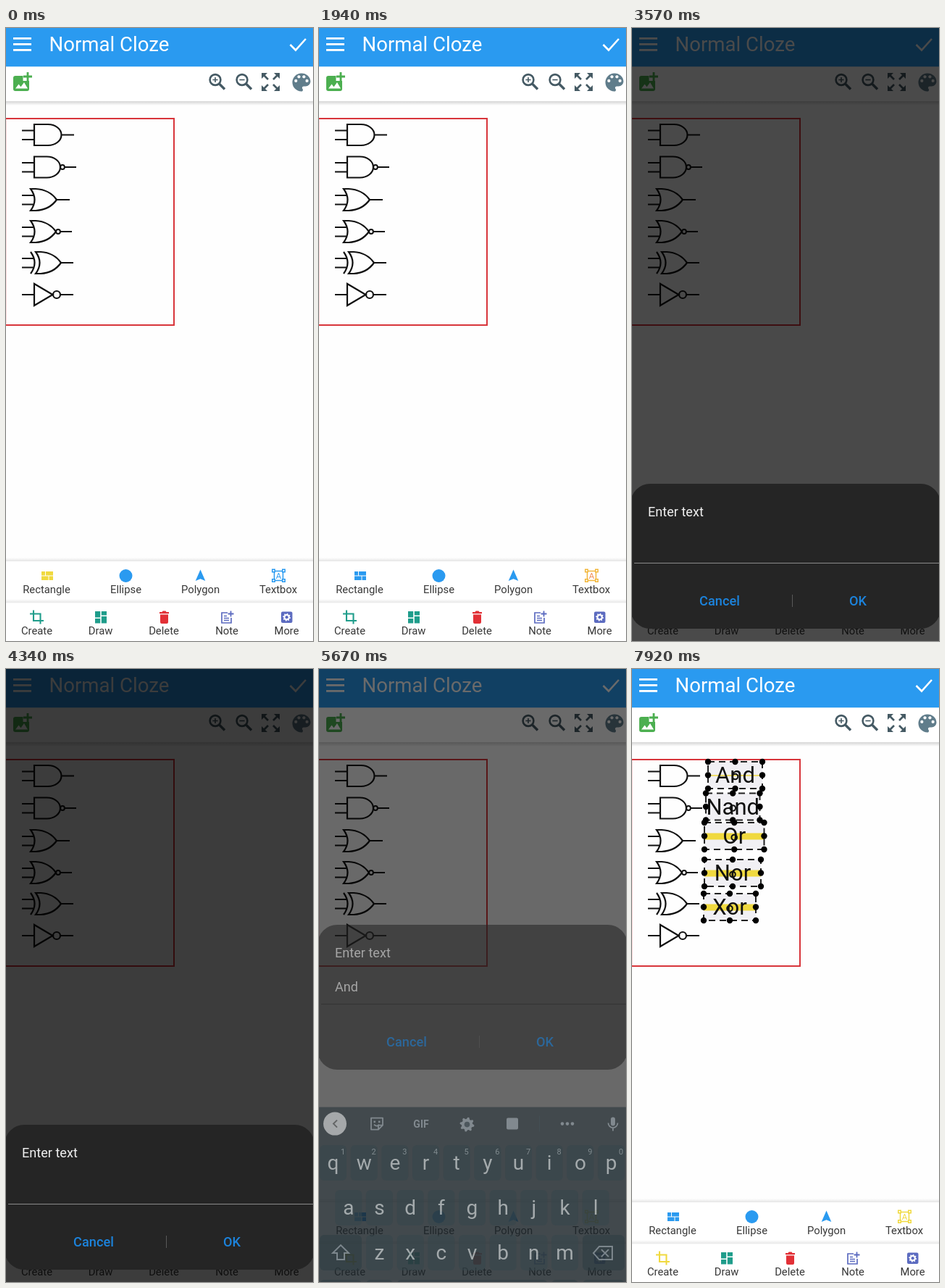
These frames come from a looping animation (424x846 px, 8 s). An HTML page with a canvas:

```html
<!DOCTYPE html>
<html lang="en">
<head>
<meta charset="utf-8">
<title>Normal Cloze</title>
<style>
html, body { margin: 0; width: 100%; height: 100%; overflow: hidden; background: #fefefe; }
canvas { display: block; width: 424px; height: 846px; }
</style>
</head>
<body>
<canvas id="stage"></canvas>
<script>
const W = 424, H = 846, LOOP = 8000;
const BLUE = '#2a9af0', YELLOW = '#f0d93f', TEAL = '#1f9d8b', INDIGO = '#5c6bc0', SLATE = '#455a64';
const canvas = document.getElementById('stage');
const ratio = window.devicePixelRatio || 1;
canvas.width = W * ratio;
canvas.height = H * ratio;
const c = canvas.getContext('2d');
c.scale(ratio, ratio);

const clamp = v => Math.max(0, Math.min(1, v));
const ramp = (t, a, b) => clamp((t - a) / (b - a));
const easeOut = p => 1 - (1 - p) ** 2;
const mix = (a, b, p) => a + (b - a) * p;

function rect(x, y, w, h, color) {
  c.fillStyle = color;
  c.fillRect(x, y, w, h);
}
function round(x, y, w, h, r, color) {
  c.fillStyle = color;
  c.beginPath();
  c.roundRect(x, y, w, h, r);
  c.fill();
}
function disc(x, y, r, color) {
  c.fillStyle = color;
  c.beginPath();
  c.arc(x, y, r, 0, Math.PI * 2);
  c.fill();
}
function ring(x, y, r, color, width, fill) {
  if (fill) disc(x, y, r, fill);
  c.strokeStyle = color;
  c.lineWidth = width;
  c.beginPath();
  c.arc(x, y, r, 0, Math.PI * 2);
  c.stroke();
}
function stroke(path, color, width) {
  c.strokeStyle = color;
  c.lineWidth = width;
  c.stroke(new Path2D(path));
}
function fill(path, color) {
  c.fillStyle = color;
  c.fill(new Path2D(path));
}
function text(s, x, y, size, color, align = 'center', weight = 400) {
  c.font = `${weight} ${size}px Roboto, sans-serif`;
  c.textAlign = align;
  c.fillStyle = color;
  c.fillText(s, x, y);
}
function shade(y, h, from, to) {
  const g = c.createLinearGradient(0, y, 0, y + h);
  g.addColorStop(0, `rgba(0,0,0,${from})`);
  g.addColorStop(1, `rgba(0,0,0,${to})`);
  rect(0, y, W, h, g);
}
function gear(x, y, r, color, hole) {
  c.fillStyle = color;
  c.beginPath();
  for (let i = 0; i < 32; i++) {
    const a = (i + 0.5) * Math.PI / 16, d = i % 4 < 2 ? r : r * 0.76;
    c.lineTo(x + d * Math.cos(a), y + d * Math.sin(a));
  }
  c.fill();
  disc(x, y, r * 0.38, hole);
}

function zoomIcon(x, plus) {
  ring(x, 71.5, 7.4, SLATE, 2.6);
  stroke(`M${x + 5} 76.5l8 8`, SLATE, 3.4);
  stroke(`M${x - 3.6} 71.5h7.2` + (plus ? `M${x} 67.9v7.2` : ''), SLATE, 1.6);
}

function header() {
  rect(0, 0, W, 53.5, BLUE);
  for (const y of [14, 22, 30]) rect(10, y - 1, 25, 2.8, '#fff');
  text('Normal Cloze', 59.5, 32, 27.6, '#fff', 'left');
  stroke('M392.5 23l7.5 7.5L414 15', '#fff', 2.6);

  rect(0, 53.5, W, 47.5, '#fff');
  shade(101, 6, 0.16, 0);
  round(10, 66, 22, 21, 3, '#4caf50');
  rect(23.5, 60, 13, 13, '#fff');
  stroke('M24 67h12M30 61v12', '#4caf50', 2.8);
  fill('M13 83.5l4.5-6 3 3.8 4.5-6.3 5 8.5z', '#fff');
  zoomIcon(289, true);
  zoomIcon(326, false);
  for (const sx of [-1, 1]) for (const sy of [-1, 1]) {
    c.save();
    c.translate(365.5, 74.5);
    c.scale(sx, sy);
    fill('M12.5 12.5v-8l-8 8z', SLATE);
    stroke('M10 10L3.5 3.5', SLATE, 2.6);
    c.restore();
  }
  c.save();
  c.translate(408, 75);
  c.scale(1.39, 1.39);
  c.translate(-12, -12);
  fill('M12 3a9 9 0 0 0 0 18c.83 0 1.5-.67 1.5-1.5 0-.39-.15-.74-.39-1.01-.23-.26-.38-.61-.38-.99 0-.83.67-1.5 1.5-1.5H16c2.76 0 5-2.24 5-5 0-4.42-4.03-8-9-8z', '#607d8b');
  for (const [x, y] of [[6.5, 10.5], [9.5, 6.5], [14.5, 6.5], [17.5, 10.5]]) disc(x, y, 1.5, '#fff');
  c.restore();
}

const orBody = (x, y, tip) =>
  `M${x} ${y - 15}h7Q${tip - 10} ${y - 14} ${tip} ${y}Q${tip - 10} ${y + 14} ${x + 7} ${y + 15}h-7Q${x + 11} ${y} ${x} ${y - 15}z`;
const andBody = (y, flat) => `M39 ${y - 14.5}h${flat}a18.5 14.5 0 0 1 0 29h${-flat}z`;
const inputs = (y, end) => `M22 ${y - 6}H${end}M22 ${y + 6.5}H${end}`;

function gates() {
  const ink = d => stroke(d, '#111', 2.2);
  ink(inputs(147.5, 39) + andBody(147.5, 19) + 'M76.5 147.5H94');
  ink(inputs(192, 39) + andBody(192, 17.5) + 'M81 192H97');
  ink(inputs(237, 38) + orBody(34, 237, 70) + 'M70 237H88');
  ink(inputs(281, 38) + orBody(34, 281, 69) + 'M75 281H91');
  ink(inputs(324, 38) + orBody(41, 324, 76) + 'M34 309Q45 324 34 339M76 324H93');
  ink('M22 368H39M39 353v30l25.5-15zM75.5 368H93');
  ring(78, 192, 2.9, '#111', 2);
  ring(72, 281, 2.9, '#111', 2);
  ring(70, 368, 5, '#111', 2.2);
}

// word, left, top, width, bar thickness, appearance time
const boxes = [
  ['And', 105, 128, 75, 1.5, 5760],
  ['Nand', 102, 171.5, 74.5, 0, 6600],
  ['Or', 100, 212, 82.5, 9, 6920],
  ['Nor', 100, 263, 78, 9, 7220],
  ['Xor', 99, 310, 72, 9, 7510]
];
function label([word, x, y, w, bar]) {
  const h = 37, mx = x + w / 2, my = y + h / 2;
  rect(x, y, w, h, '#f1f0f4');
  if (bar) rect(x, my - bar / 2 + 0.5, w, bar, YELLOW);
  text(word, mx, y + 29, 31, '#111');
  c.setLineDash([9, 6]);
  stroke(`M${x} ${y}h${w}v${h}h${-w}z`, '#222', 2);
  c.setLineDash([]);
  for (const px of [x, mx, x + w]) for (const py of [y, my, y + h])
    if (px !== mx || py !== my) disc(px, py, 4.2, '#000');
  ring(mx, my + 2, 3.8, '#111', 2);
}

function textboxIcon(edge, letter) {
  stroke('M370.5 749.5h12v13h-12z', edge, 1.5);
  for (const x of [367, 381]) for (const y of [746.5, 760]) {
    rect(x, y, 5, 5, edge);
    rect(x + 1.5, y + 1.5, 2, 2, '#fff');
  }
  text('A', 376.5, 760.3, 11.5, letter);
}

function bottomBars(t) {
  const picked = t >= 1880;
  shade(731, 5, 0, 0.1);
  rect(0, 736, W, 57, '#fff');
  shade(788, 5.5, 0, 0.1);
  rect(0, 793.5, W, 53, '#fff');

  const quilt = picked ? BLUE : YELLOW;
  rect(49, 750, 5, 5.5, quilt);
  rect(55, 750, 10, 5.5, quilt);
  rect(49, 756.5, 9.5, 5.5, quilt);
  rect(59.5, 756.5, 5.5, 5.5, quilt);
  disc(165.5, 756, 9, BLUE);
  fill('M268.5 747.5l6.8 15.5-6.8-2.8-6.8 2.8z', BLUE);
  if (!picked) textboxIcon(BLUE, BLUE);
  else if (t < 2080) textboxIcon('#f2b73c', '#f08c50');
  else textboxIcon(YELLOW, YELLOW);

  const crop = t >= 2700 ? YELLOW : TEAL;
  stroke('M33 808.5h14.5v14M38 803.5v14.5h14', crop, 2.1);
  rect(123, 805, 7.2, 8.5, TEAL);
  rect(123, 815, 7.2, 6.5, TEAL);
  rect(131.8, 805, 7.2, 5.5, TEAL);
  rect(131.8, 812, 7.2, 9.5, TEAL);
  fill('M212 806h3.5l1-1.5h4l1 1.5h3.500v2.200h-13zM213 809.500h11v10.500q0 2-2 2h-7q-2 0-2-2z', '#e23036');
  stroke('M306 807h-8v14h13v-7M301 811.500h4M301 814.500h7M301 817.500h7', INDIGO, 1.7);
  stroke('M306.500 808.500h8M310.500 804.500v8', INDIGO, 1.8);
  round(380, 805.500, 15.500, 15.500, 2, INDIGO);
  gear(387.700, 813.200, 5.500, '#fff', INDIGO);

  [['Rectangle', 56], ['Ellipse', 165.5], ['Polygon', 268.5], ['Textbox', 376]]
    .forEach(([s, x]) => text(s, x, 780, 14.8, '#383838'));
  [['Create', 42.5], ['Draw', 130.5], ['Delete', 218], ['Note', 305], ['More', 387.5]]
    .forEach(([s, x]) => text(s, x, 837, 14.8, '#383838'));
}

function dialog(y, alpha, typed, line) {
  c.globalAlpha = alpha;
  round(-2, y, W + 4, 200, 27, '#252525');
  text('Enter text', 22, y + 45, 18.1, '#f0f0f0', 'left');
  text(typed, 22, y + 92, 18.1, '#f0f0f0', 'left');
  rect(3, y + 109, W - 3, 1, line);
  text('Cancel', 121, y + 168, 18.2, '#1c83dc', 'center', 500);
  text('OK', 312, y + 168, 18.2, '#1c83dc', 'center', 500);
  rect(221, y + 153, 1, 17, '#5a5a5a');
  c.globalAlpha = 1;
}

function key(x, y, w, s, hint) {
  round(x, y, w, 49, 6, '#37474c');
  text(s, x + w / 2, y + 34, 28, '#f2f4f5');
  if (hint) text(hint, x + w - 5, y + 12.5, 11, '#b4bcc0');
}
function keyboard(top, alpha) {
  const grey = '#b0bac0', pitch = 42.67, mid = top + 23;
  c.globalAlpha = alpha;
  rect(0, top, W, 300, '#263238');
  disc(22, mid, 16, '#f0f0f0');
  stroke(`M25 ${mid - 5}l-5 5 5 5`, '#333', 2);
  c.lineJoin = 'round';
  stroke(`M72 ${mid - 8}h16v10l-6 6h-10zM88 ${mid + 2}h-6v6M76 ${mid + 1}q4 4 7 0`, grey, 1.8);
  c.lineJoin = 'miter';
  rect(75.5, mid - 4, 2.5, 2.5, grey);
  rect(82, mid - 4, 2.5, 2.5, grey);
  text('GIF', 141, mid + 5, 14, grey, 'center', 700);
  gear(204.500, mid + 1, 10, grey, '#263238');
  round(259, mid - 8, 16, 16, 2, grey);
  rect(304, top + 12, 1, 22, '#45525a');
  for (const x of [336, 343, 350]) disc(x, mid, 2.3, grey);
  round(403, mid - 9, 6, 12, 3, grey);
  stroke(`M399.500 ${mid - 1}a6.500 6.500 0 0 0 13 0M406 ${mid + 5}v5`, grey, 1.8);

  [...'qwertyuiop'].forEach((s, i) => key(1 + i * pitch, top + 52.5, 37, s, (i + 1) % 10 + ''));
  [...'asdfghjkl'].forEach((s, i) => key(22.3 + i * pitch, top + 114.5, 37, s));
  [...'zxcvbnm'].forEach((s, i) => key(65 + i * pitch, top + 176.5, 37, s));
  const y = top + 176.5;
  for (const x of [1, 364]) round(x, y, 58, 49, 6, '#2f3d43');
  stroke(`M30 ${y + 14}l-11 11h6v9h10v-9h6z`, grey, 2);
  stroke(`M379 ${y + 25}l8-9h18v18h-18zM390 ${y + 20}l10 10M400 ${y + 20}l-10 10`, grey, 2);
  for (const [x, w, s] of [[1, 58, '?123'], [65, 37, ','], [107.7, 208, ''], [321, 37, '.'], [364, 58, '↵']]) {
    round(x, top + 238.5, w, 49, 6, '#2f3d43');
    text(s, x + w / 2, top + 269, 18, '#f2f4f5');
  }
  c.globalAlpha = 1;
}

function prompt(t) {
  if (t < 3120 || t > 5910) return;
  const leave = ramp(t, 5590, 5780);
  const dim = t < 3570 ? 0.71 * ramp(t, 3318, 3570) : mix(0.71, 0.79, ramp(t, 3570, 4700));
  rect(0, 0, W, H, `rgba(0,0,0,${dim * (1 - ramp(t, 5590, 5900))})`);

  const raised = t >= 4740;
  if (raised && t < 5590) rect(0, 551, W, H - 551, '#060606');
  const y = raised ? 353 : 629 + 45 * (1 - easeOut(ramp(t, 3270, 3500)));
  const typed = 'And'.slice(0, Math.floor(clamp((t - 5040) / 300) * 3));
  dialog(y, ramp(t, 3230, 3410) * (1 - leave), typed, raised ? '#2b2b2b' : '#8a8a8a');
  if (t >= 4780 && leave < 1) {
    const shown = ramp(t, 4780, 5050);
    const top = 551 + 295 * (1 - shown) ** 2.25 + 295 * leave ** 2;
    keyboard(top, clamp(0.6 + (t - 4890) / 300) * (1 - leave));
  }
}

function draw(t) {
  rect(0, 0, W, H, '#fefefe');
  header();
  stroke('M0 125H232V410H0', '#d8353b', 2);
  rect(0, 126, 1, 283, '#fbdcdd');
  gates();
  for (const b of boxes) if (t >= b[5]) label(b);
  if (t >= 6290 && t < 6450) ring(110, 197, 12, '#c3cfe4', 1.8, 'rgba(255,255,255,.6)');
  bottomBars(t);
  prompt(t);
}

const start = performance.now();
function tick() {
  draw((performance.now() - start) % LOOP);
  requestAnimationFrame(tick);
}
tick();
</script>
</body>
</html>
```
